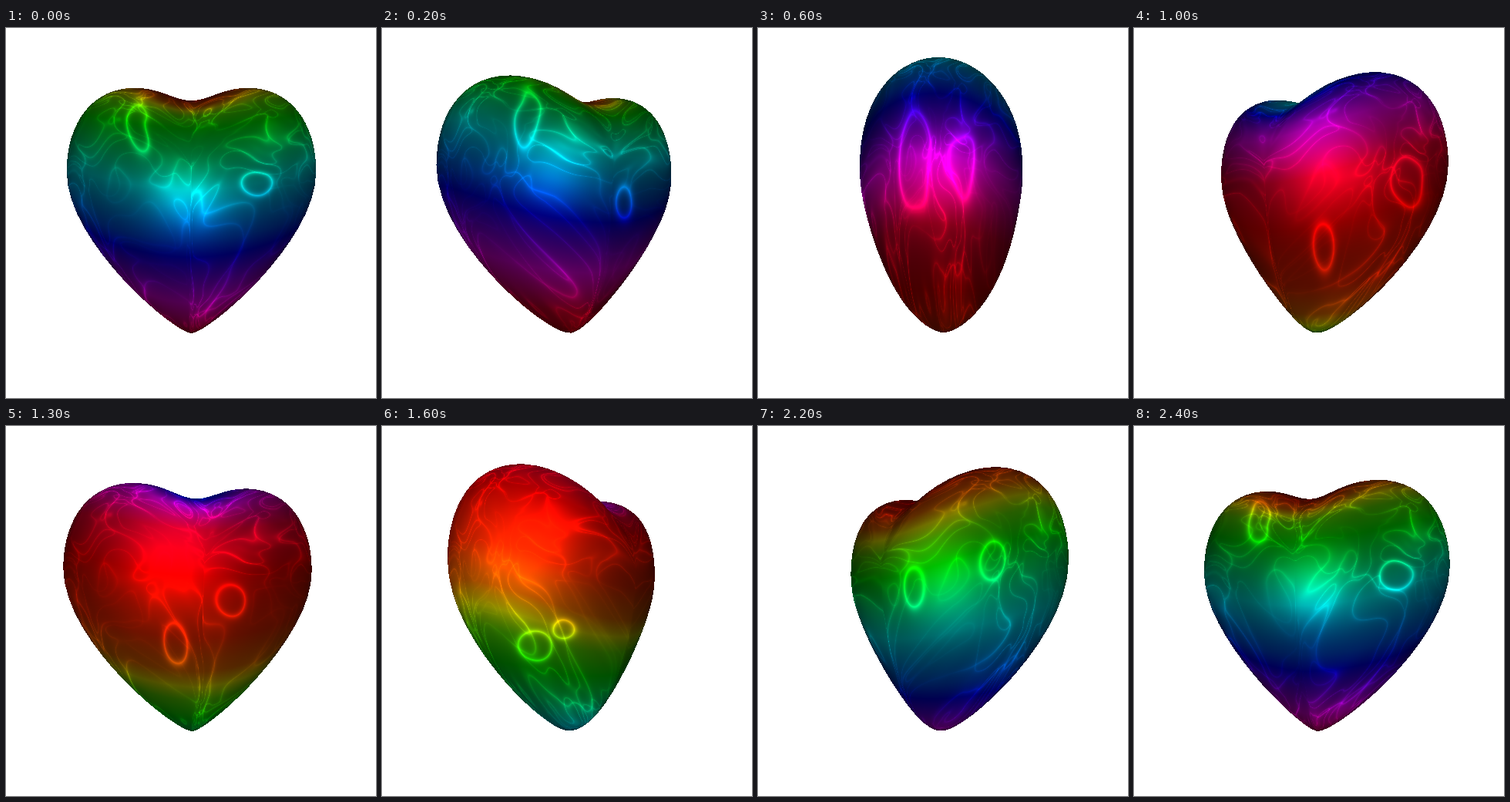
These frames come from a looping animation (480x480 px, 2500 ms). An HTML page with a canvas:

```html
<!DOCTYPE html>
<html lang="en">
<head>
<meta charset="utf-8">
<title>Turning heart</title>
<style>
  html, body { margin: 0; width: 100%; height: 100%; overflow: hidden; background: #fff; }
  canvas { display: block; width: 480px; height: 480px; }
</style>
</head>
<body>
<canvas id="stage" width="480" height="480"></canvas>
<script>
const SIZE = 480, MID = 240, CAMERA = 400, DEPTH = 97;
const STEPS = 25, STEP_MS = 100;
const CENTER_Y = -45, HALF = 48, RINGS = 40;
const ctx = document.getElementById("stage").getContext("2d");

// Right half of the outline, from the cleft over the lobe to the tip.
const CURVES = [
  [0, -140, 22, -140, 38, -156, 72, -156],
  [72, -156, 125, -156, 157, -112, 157, -52],
  [157, -52, 157, 40, 20, 154, 0, 154]
];

// Position along the colour wave, hue in degrees.
const HUES = [
  [0, 28], [.03, 50], [.08, 95], [.14, 120], [.28, 178], [.4, 220],
  [.55, 295], [.67, 348], [.78, 360], [.92, 370], [1, 388]
];

// Key poses of the light: step, glow [x, y, radius], two loops [x, y, rx, ry].
const LIGHT = [
  [0, [233, 225, 48], [330, 207, 18, 17], [172, 130, 13, 30]],
  [2, [220, 190, 50], [316, 225, 10, 20], [188, 120, 14, 38]],
  [6, [235, 195, 60], [268, 180, 14, 42], [203, 170, 18, 65]],
  [10, [250, 185, 70], [358, 202, 20, 30], [242, 285, 12, 32]],
  [16, [185, 150, 85], [235, 263, 15, 11], [195, 283, 22, 20]],
  [20, [250, 195, 65], [258, 150, 16, 32], [244, 287, 14, 28]],
  [24, [232, 205, 50], [345, 199, 20, 20], [162, 122, 14, 24]]
];
LIGHT.push([STEPS, ...LIGHT[0].slice(1)]);

const mix = (a, b, k) => a + (b - a) * k;
const clamp = (v, lo, hi) => Math.max(lo, Math.min(hi, v));

function bezier([ax, ay, bx, by, cx, cy, dx, dy], t) {
  const s = 1 - t;
  const at = (a, b, c, d) => s * s * s * a + 3 * s * s * t * b + 3 * s * t * t * c + t * t * t * d;
  return [at(ax, bx, cx, dx), at(ay, by, cy, dy)];
}

function makeOutline() {
  const right = [];
  for (let i = 0; i <= HALF; i++) {
    const seg = Math.min(2, Math.floor(i * 3 / HALF));
    right.push(bezier(CURVES[seg], i * 3 / HALF - seg));
  }
  const left = right.slice(1, -1).reverse().map(([x, y]) => [-x, y]);
  return right.concat(left);
}

const outline = makeOutline();
const COLS = outline.length;

// The outline is inflated around a centre; row 0 is the front, the last row the back.
function point(col, row) {
  const [x, y] = outline[(col + COLS) % COLS];
  const a = row * Math.PI / RINGS, c = Math.cos(a), r = Math.sin(a);
  const power = 1 + .2 * Math.max(0, y / 154);
  return [x * r, CENTER_Y + (y - CENTER_Y) * r, Math.sign(c) * DEPTH * Math.abs(c) ** power];
}

function normal(col, row) {
  if (row === 0 || row === RINGS) return [0, 0, row ? -1 : 1];
  const a = point(col - 1, row), b = point(col + 1, row);
  const c = point(col, row - 1), d = point(col, row + 1);
  const u = b.map((v, i) => v - a[i]), w = d.map((v, i) => v - c[i]);
  const n = [u[1] * w[2] - u[2] * w[1], u[2] * w[0] - u[0] * w[2], u[0] * w[1] - u[1] * w[0]];
  const p = point(col, row);
  const out = n[0] * p[0] + n[1] * (p[1] - CENTER_Y) + n[2] * p[2];
  const len = Math.hypot(...n) * (out < 0 ? -1 : 1) || 1;
  return n.map(v => v / len);
}

const mesh = [], faces = [];
for (let row = 0; row <= RINGS; row++) {
  for (let col = 0; col < COLS; col++) {
    mesh.push({ p: point(col, row), n: normal(col, row) });
    if (row === RINGS) continue;
    const a = row * COLS + col, b = row * COLS + (col + 1) % COLS;
    faces.push([a, b, a + COLS], [b, b + COLS, a + COLS]);
  }
}

// Seeded gradient noise.
const angles = [];
for (let i = 0, seed = 71; i < 256; i++) {
  seed = (seed * 1664525 + 1013904223) % 4294967296;
  angles.push(seed / 4294967296 * Math.PI * 2);
}
const gradX = angles.map(Math.cos), gradY = angles.map(Math.sin);

function noise(x, y) {
  const ix = Math.floor(x), iy = Math.floor(y), fx = x - ix, fy = y - iy;
  const corner = (i, j) => {
    const k = ((ix + i) * 37 + (iy + j) * 101) & 255;
    return gradX[k] * (fx - i) + gradY[k] * (fy - j);
  };
  const sx = fx * fx * (3 - 2 * fx), sy = fy * fy * (3 - 2 * fy);
  return mix(mix(corner(0, 0), corner(1, 0), sx), mix(corner(0, 1), corner(1, 1), sx), sy);
}

const thread = (v, w) => w / (w + Math.abs(v));

function hueColor(u) {
  let i = 1;
  while (HUES[i][0] < u) i++;
  const [u0, h0] = HUES[i - 1], [u1, h1] = HUES[i];
  const h = mix(h0, h1, (u - u0) / (u1 - u0)) / 60;
  return [5, 3, 1].map(k => {
    const m = (k + h) % 6;
    return 1 - clamp(Math.min(m, 4 - m), 0, 1);
  });
}
const palette = Array.from({ length: 1024 }, (_, i) => hueColor(i / 1024));

function lightAt(step) {
  let i = 1;
  while (LIGHT[i][0] <= step) i++;
  const a = LIGHT[i - 1], b = LIGHT[i], k = (step - a[0]) / (b[0] - a[0]);
  const parts = a.slice(1).map((part, j) => part.map((v, m) => mix(v, b[j + 1][m], k)));
  return { glow: parts[0], loops: parts.slice(1) };
}

function brightness(x, y, nx, ny, nz, light) {
  const wx = noise(nx * 3 + 7, ny * 3 + 2), wy = noise(nx * 3 + 19, ny * 3 + 11);
  const px = nx + wx * .45, py = ny + wy * .45;
  const patch = clamp(.55 + noise(nx * 2.2 + 31, ny * 2.2 + 5) * 1.3, .15, 1);
  const lines = patch * (thread(noise(px * 3.2 + 3, py * 3.2 + 8), .025) * .65
    + thread(noise(px * 6 + 13, py * 6 + 23), .025) * .45);

  let loops = 0;
  const qx = x + wx * 14, qy = y + wy * 14;
  for (const [cx, cy, rx, ry] of light.loops) {
    const dx = (qx - cx) / rx, dy = (qy - cy) / ry, d2 = dx * dx + dy * dy;
    if (d2 > 6) continue;
    const gap = Math.abs(Math.sqrt(d2) - 1) * Math.min(rx, ry);
    loops = Math.max(loops, Math.exp(-gap / 2.6));
  }

  const [gx, gy, gr] = light.glow;
  const far = ((x - gx) ** 2 + (y - gy) ** 2) / (gr * gr);
  const glow = Math.exp(-far) * gr / 75;
  return .12 + .24 * nz ** 1.5 + lines * (.3 + .3 * nz) + loops * .5 + glow * (.6 + lines * .5);
}

function render(step) {
  const turn = step / STEPS * Math.PI * 2, cos = Math.cos(turn), sin = Math.sin(turn);
  const depth = new Float32Array(SIZE * SIZE).fill(-1e9);
  const data = new Float32Array(SIZE * SIZE * 5);
  const verts = mesh.map(({ p, n }) => {
    const z = p[2] * cos - p[0] * sin, s = CAMERA / (CAMERA - z);
    return {
      x: MID + (p[0] * cos + p[2] * sin) * s, y: MID + p[1] * s, z,
      v: [p[0], p[1], n[0] * cos + n[2] * sin, n[1], n[2] * cos - n[0] * sin]
    };
  });

  for (const [i, j, k] of faces) {
    const a = verts[i], b = verts[j], c = verts[k];
    const area = (b.x - a.x) * (c.y - a.y) - (c.x - a.x) * (b.y - a.y);
    if (Math.abs(area) < 1e-6) continue;
    const x0 = Math.ceil(Math.min(a.x, b.x, c.x)), x1 = Math.floor(Math.max(a.x, b.x, c.x));
    const y0 = Math.ceil(Math.min(a.y, b.y, c.y)), y1 = Math.floor(Math.max(a.y, b.y, c.y));
    for (let y = y0; y <= y1; y++) {
      for (let x = x0; x <= x1; x++) {
        const wb = ((x - a.x) * (c.y - a.y) - (c.x - a.x) * (y - a.y)) / area;
        const wc = ((b.x - a.x) * (y - a.y) - (x - a.x) * (b.y - a.y)) / area;
        const wa = 1 - wb - wc;
        if (wa < -1e-4 || wb < -1e-4 || wc < -1e-4) continue;
        const at = y * SIZE + x, z = wa * a.z + wb * b.z + wc * c.z;
        if (z <= depth[at]) continue;
        depth[at] = z;
        for (let m = 0; m < 5; m++) data[at * 5 + m] = wa * a.v[m] + wb * b.v[m] + wc * c.v[m];
      }
    }
  }

  const image = ctx.createImageData(SIZE, SIZE), light = lightAt(step);
  image.data.fill(255);
  for (let at = 0; at < depth.length; at++) {
    if (depth[at] < -1e8) continue;
    const d = at * 5, ox = data[d], oy = data[d + 1];
    const nx = data[d + 2], ny = data[d + 3], nz = data[d + 4];
    const len = Math.hypot(nx, ny, nz) || 1;
    const lum = brightness(at % SIZE, Math.floor(at / SIZE),
      nx / len, ny / len, Math.max(0, nz / len), light);
    // Colour bands bend up at the sides and sink into the cleft.
    const dip = 70 * Math.exp(-((ox / 45) ** 2) - ((oy + 140) / 30) ** 2);
    const level = oy + MID + 40 * (ox / 157) ** 2 - dip;
    const u = (level - 90) / 310 * .7 + step / STEPS;
    const rgb = palette[Math.floor((u - Math.floor(u)) * 1024) & 1023];
    for (let m = 0; m < 3; m++) image.data[at * 4 + m] = 255 * Math.min(1, rgb[m] * lum);
  }
  return image;
}

const pictures = [];
const start = performance.now();
let shown = -1;

function play() {
  const step = Math.floor((performance.now() - start) / STEP_MS) % STEPS;
  if (step !== shown) {
    pictures[step] = pictures[step] || render(step);
    ctx.putImageData(pictures[step], 0, 0);
    shown = step;
  }
  requestAnimationFrame(play);
}
play();
</script>
</body>
</html>
```
